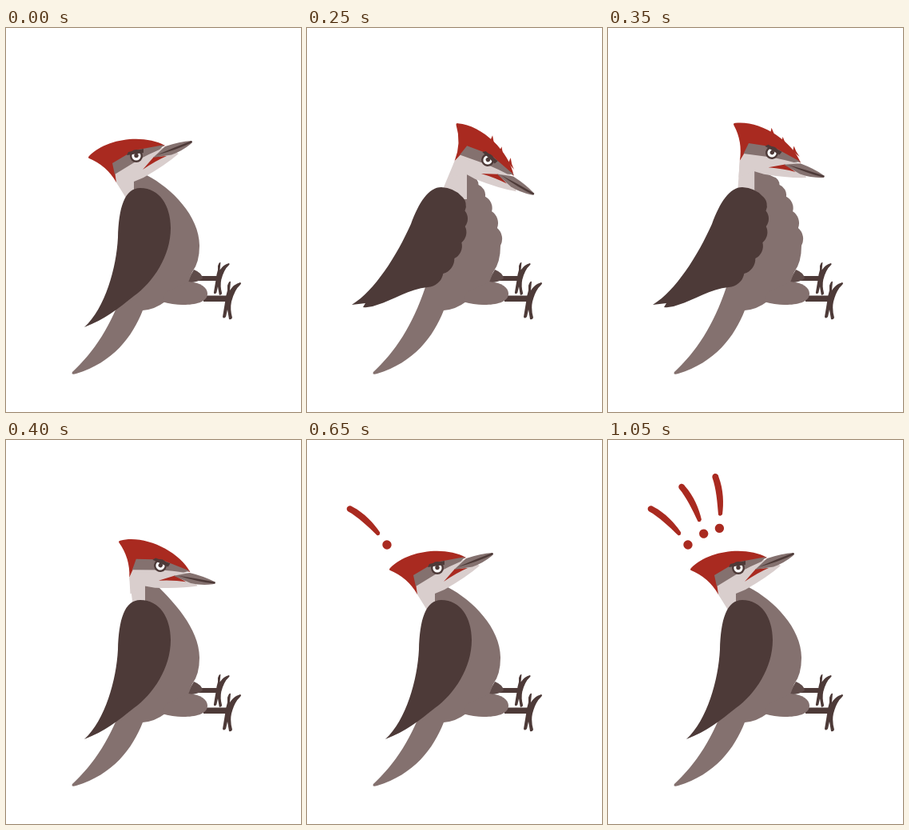
These frames come from a looping animation (369 px wide and 480 px high, 1.15 s). An HTML page:

```html
<!DOCTYPE html>
<html lang="en">
<head>
<meta charset="utf-8">
<title>Woodpecker</title>
<style>
  html, body { margin: 0; width: 100%; height: 100%; overflow: hidden; background: #fff; }
  svg { display: block; width: 369px; height: 480px; }
  .body { fill: #84716f; }
  .dark { fill: #4d3a38; }
  .pale { fill: #d9cecd; }
  .red { fill: #a92a20; }
</style>
</head>
<body>
<svg viewBox="0 0 369 480">
  <defs>
    <path id="foot" d="M-3 4Q-2 -5 0 -11L0 -17Q2 -23 4 -22L3 -11Q8 -19 16 -21Q18 -20 16 -18Q9 -12 5 3Q3 12 6 23Q5 26 2 25L0 13L-2 22Q-5 25 -6 22Z"/>
    <path id="bar" d="M-3.8 -64C-4 -70 4 -70 4.2 -64C9 -48 8 -30 5 -17Q2 -14 0 -17C0 -32 0 -50 -3.8 -64Z"/>
  </defs>

  <!-- far leg -->
  <path class="dark" d="M240 310H265V316H240Z"/>
  <use class="dark" href="#foot" transform="translate(265 312) scale(.86)"/>
  <path fill="#5f4c4a" d="M235 302Q245 306 246 313Q239 319 226 318Z"/>

  <path id="torso" class="body"/>
  <path id="neck" class="pale"/>

  <!-- near leg -->
  <path class="dark" d="M247 334.5H277V342H247Z"/>
  <use class="dark" href="#foot" transform="translate(277 339)"/>
  <path class="body" d="M200 330L228 317C244 318 252 325 252 332C252 343 236 346 222 346Q208 346 195 342Z"/>

  <path id="wing" class="dark"/>

  <!-- drawn in the resting pose -->
  <g id="head">
    <path class="red" d="M104 160C125 138 172 132 199 147L160 160L138 178V193Q126 172 104 163Q102 162 104 160Z"/>
    <path id="tufts" class="red"/>
    <path class="pale" d="M135 172L165 157L199 149L216 157Q200 171 172 187L160 192L150 210L138 193Z"/>
    <path class="body" d="M133 169L160 153L198 146L192 152Q180 157 167 164L136 183Z"/>
    <path class="red" d="M171 177L185 161L201 160Q187 166 171 177Z"/>
    <path class="body" d="M184 162L199 148Q217 142 232 141Q234 142 231 145Q220 154 207 158.5Z"/>
    <path class="dark" d="M188 159Q211 149 232 141L233 143Q214 152 188 159Z"/>
    <circle class="dark" cx="163" cy="160" r="8"/>
    <circle cx="163" cy="160" r="5.6" fill="#fff"/>
    <circle class="dark" cx="163" cy="159.5" r="2.7"/>
    <path class="dark" d="M151 159L153 155L172 151L172 156L158 158Z"/>
  </g>
  <g id="marks" class="red"></g>
</svg>
<script>
const LOOP = 1150, STEP = 50, PECK_START = 150, MARKS_START = 550, MARK_STEP = 100;
const $ = id => document.getElementById(id);

// eye position and head angle
const rest = { x: 163, y: 160, angle: 0 };
const lift = { x: 177, y: 156, angle: 13.5 };
const reach = { x: 193, y: 157, angle: 32 };
const strike = { x: 226, y: 165, angle: 51, ruffled: true };
const recoil = { x: 205, y: 156, angle: 39, ruffled: true };
const PECK = [lift, reach, strike, recoil, recoil, reach, lift];

// row of feather bumps along a cubic curve
function scallops(a, b, c, d, count) {
  const at = t => [0, 1].map(k => {
    const u = 1 - t;
    return u * u * u * a[k] + 3 * u * u * t * b[k] + 3 * u * t * t * c[k] + t * t * t * d[k];
  });
  let path = `L${a}`, last = a;
  for (let i = 1; i <= count; i++) {
    const p = at(i / count);
    const r = 0.8 * Math.hypot(p[0] - last[0], p[1] - last[1]);
    path += `A${r} ${r} 0 0 1 ${p}`;
    last = p;
  }
  return path;
}

const WING = `M98 374C124 350 138 300 140 262C141 225 148 200 168 200
  C192 200 206 222 206 250C206 285 184 318 160 335C140 351 124 364 98 374Z`;
const RUFFLED_WING = `M56 346C85 328 112 285 130 245C140 218 152 199 168 199Q184 200 193 210
  ${scallops([193, 210], [206, 245], [195, 292], [151, 324], 6)}
  C128 326 108 340 88 346Q79 350 70 349L73 344Z`;
const BREAST = "C207 200 242 235 242 272";
const RUFFLED_BREAST = scallops([207, 186], [218, 198], [238, 235], [242, 272], 5);

const tuft = x => `M${x} 136L${x + 3} 142H${x + 14}Q${x + 6} 140 ${x} 136Z`;
$("tufts").setAttribute("d", [0, 1, 2].map(i => tuft(143 + 18 * i)).join(""));

// three marks fan out over the crest
$("marks").innerHTML = [0, 1, 2].map(i => {
  const place = `translate(${100 + 19.7 * i} ${131 - 17.5 * i + 3.6 * i * i}) rotate(${20.7 * i - 46})`;
  return `<use href="#bar" transform="${place}"/><circle r="5.7" transform="${place}"/>`;
}).join("");
const parts = [...$("marks").children];

function pose({ x, y, angle, ruffled }) {
  const r = angle * Math.PI / 180, c = Math.cos(r), s = Math.sin(r);
  const onHead = (px, py) => {
    const dx = px - rest.x, dy = py - rest.y;
    return [x + dx * c - dy * s, y + dx * s + dy * c];
  };
  const nape = onHead(138, 193), throat = onHead(160, 191), chin = onHead(176, 184);

  $("head").setAttribute("transform",
    `translate(${x} ${y}) rotate(${angle}) translate(${-rest.x} ${-rest.y})`);
  $("tufts").style.display = ruffled ? "" : "none";
  $("neck").setAttribute("d", `M${nape}L${151 + angle * 0.27} 214H${throat[0]}L${throat}Z`);
  $("torso").setAttribute("d", `M${throat}L${chin}${ruffled ? RUFFLED_BREAST : BREAST}
    Q242 293 233 305L228 318L222 346L199 342Q186 352 171 353
    C158 386 134 418 88 432Q81 434 83 430C110 405 132 372 148 324L154 215Z`);
  $("wing").setAttribute("d", ruffled ? RUFFLED_WING : WING);
}

let shown = null;
function draw() {
  const t = performance.now() % LOOP;
  const now = PECK[Math.floor((t - PECK_START) / STEP)] || rest;
  if (now !== shown) pose(shown = now);
  // each mark arrives as a bar, then its dot
  parts.forEach((el, i) => {
    el.style.display = t >= MARKS_START + i * MARK_STEP ? "" : "none";
  });
  requestAnimationFrame(draw);
}
draw();
</script>
</body>
</html>
```
